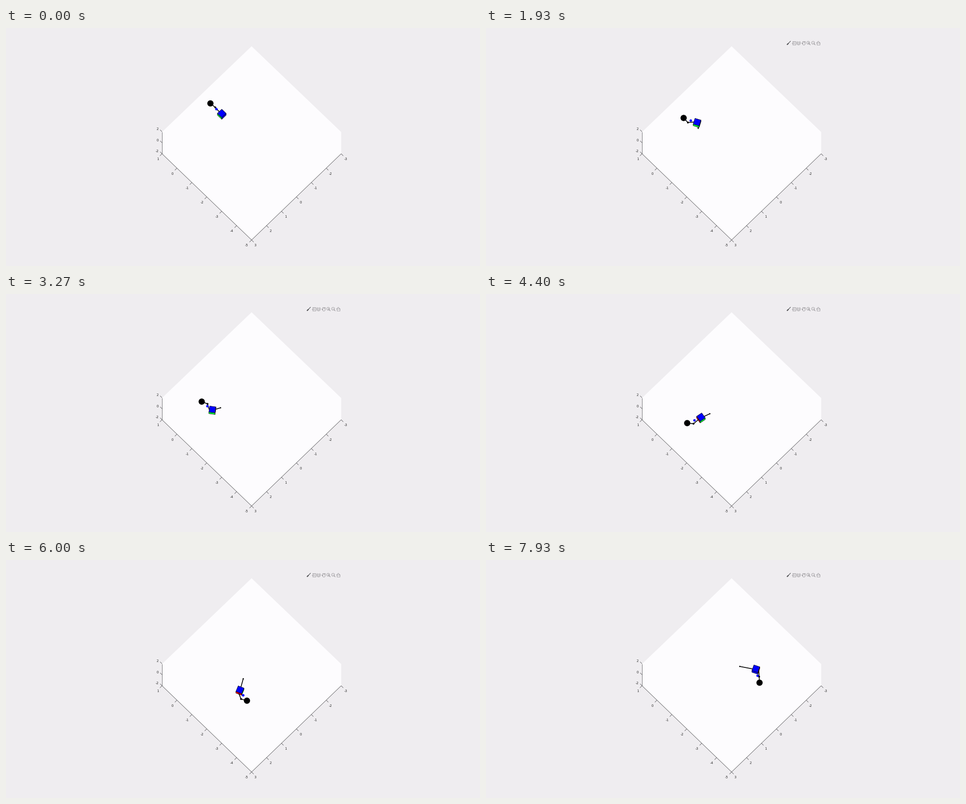
Write a matplotlib script that moves like this. It is 960 px wide and 483 px high and loops after 8000 ms.

```python
import numpy as np
import matplotlib.pyplot as plt
from matplotlib.animation import FuncAnimation
from matplotlib.patches import Arc, Circle, Polygon, Rectangle, RegularPolygon

W, H, DPI = 960, 483, 100
LOOP, INTERVAL = 8000, 40
STEP = 200 / 3           # ms between two poses
PX = 72 / DPI            # points per pixel
INK, GREY = "#47474a", "#7c7a7e"

EDGE, DROP = 12.6, 3.3   # body width and visible side height
LINK = 12.6              # length of each arm link
SWING = 8 / 3            # period of the elbow swing in s

# a few way points, all reached at the same times
TIMES = np.array([0, 1.93, 3.27, 4.4, 6, 7.13, 7.93])
HAND = [(414, 153), (400.3, 182.5), (396.4, 218.5), (407.5, 262),
        (488, 285.5), (534.8, 272.8), (554, 249)]
BODY = [(437, 175), (427.5, 192.5), (418, 236), (435.3, 251.5),
        (473.8, 265), (527.3, 246.3), (546.5, 222.3)]
TAIL = [(437, 176), (429.8, 203.5), (434.5, 231), (453.3, 243),
        (480.5, 241), (498.5, 230), (514, 216)]
YAW = [225, 197, 188, 145, 112, 40, 19]


def glide(points):
    """Smooth motion through the way points, starting at rest."""
    p = np.array(points, float)
    v = np.gradient(p, TIMES, axis=0)
    v[0] = 0

    def at(t):
        i = np.clip(np.searchsorted(TIMES, t, "right") - 1, 0, len(TIMES) - 2)
        h = TIMES[i + 1] - TIMES[i]
        u = min((t - TIMES[i]) / h, 1)
        ease = u * u * (3 - 2 * u)
        return (p[i] + ease * (p[i + 1] - p[i])
                + h * u * (1 - u) * ((1 - u) * v[i] - u * v[i + 1]))
    return at


hand_at, body_at, tail_at, yaw_at = map(glide, (HAND, BODY, TAIL, YAW))


def polar(r, deg):
    a = np.radians(deg)
    return r * np.array([np.cos(a), 0.967 * np.sin(a)])


fig = plt.figure(figsize=(W / DPI, H / DPI), dpi=DPI, facecolor="#efedf0")
ax = fig.add_axes([0, 0, 1, 1])
ax.set_xlim(0, W)
ax.set_ylim(H, 0)
ax.axis("off")


def line(xs, ys, color=INK, width=0.7, z=2):
    return ax.plot(xs, ys, color=color, lw=width * PX, zorder=z,
                   solid_capstyle="butt")[0]


def label(x, y, value, align="center"):
    ax.text(x, y, str(value), fontsize=6.9 * PX, color="#2a2a2a", ha=align,
            va="center_baseline", family="DejaVu Sans")


def draw_axes():
    mid, half, low, bottom = 497.4, 181.4, 255.2, 430.2
    left, right = mid - half, mid + half
    ax.add_patch(Polygon([(mid, 37), (right, 211), (right, low), (mid, bottom),
                          (left, low), (left, 211)], fc="#fdfcfe", ec="none"))
    line([left, left], [210.5, low])
    line([left, mid, right], [low, bottom, low])
    for k in range(7):
        dx, y = half * k / 6, low + (bottom - low) * k / 6
        for x, side in ((left + dx, -1), (right - dx, 1)):
            line([x, x + 4.3 * side], [y, y + 4.3])
        label(307 + 30 * k, 266 + 29.1 * k, 1 - k)
        label(688 - 30.5 * k, 266 + 29.1 * k, k - 3)
    for k in range(3):
        y = 210.5 + 22.3 * k
        line([left, left - 3.8], [y, y - 3.8])
        label(309.3, y - 5.8, 2 - 2 * k, "right")


def draw_toolbar():
    y, parts = 30.5, []

    def stroke(xs, ys, width=0.6):
        parts.append(line(xs, ys, GREY, width, 5))

    def shape(patch):
        patch.set(fill=False, ec=GREY, lw=0.6 * PX, zorder=5)
        parts.append(ax.add_patch(patch))

    # brush
    parts.append(line([612.5, 617], [31, 26.5], INK, 1, 5))
    parts.append(line([609.5, 612.8], [34, 31], INK, 2, 5))
    # data tip
    shape(Rectangle((620.5, y - 3.5), 6.5, 7))
    for dy in (-1.5, 0, 1.5):
        stroke([622, 625.5], [y + dy] * 2, 0.4)
    stroke([618.8, 620.5], [y, y])
    # rotate
    shape(Arc((633, y), 7.6, 7.6, theta1=-60, theta2=240))
    shape(RegularPolygon((633, y), 6, radius=2.2))
    # hand
    shape(Polygon([(639.3, 30), (641.5, 32), (641.5, 27.5), (646.7, 27.5),
                   (646.7, 32), (645.3, 34.3), (642.3, 34.3)]))
    for x in (643.2, 645):
        stroke([x, x], [26.8, 30.3], 0.5)
    # zoom in, zoom out
    for x in (652.5, 662.5):
        shape(Circle((x, 30), 3))
        stroke([x + 2.2, x + 4.5], [32.2, 34.5], 0.9)
        stroke([x - 1.6, x + 1.6], [30, 30])
    stroke([652.5, 652.5], [28.4, 31.6])
    # home
    stroke([669, 673, 677], [30.8, 26.8, 30.8])
    shape(Rectangle((670.2, 30), 5.6, 4.2))
    return parts


draw_axes()
toolbar = draw_toolbar()


def dot(radius, color="black", z=9):
    return ax.add_patch(Circle((0, 0), radius, fc=color, ec="none", zorder=z))


def quad(color, z):
    return ax.add_patch(Polygon(np.zeros((4, 2)), fc=color, ec="black",
                                lw=0.7 * PX, zorder=z))


tail = line([], [], "black", 1.6, 3)
arm = line([], [], "black", 1.6, 3)
sides = [quad(c, 6) for c in ("#ff0000", "#0000ff", "#0000ff", "#00ff3c")]
top = quad("#0000ff", 7)
ball, joint, tip = dot(6.3), dot(1.9), dot(1.3, z=3)
sensor = dot(2.5, "#0000ff")


def draw_body(center, yaw):
    down = np.array([0, DROP])
    corners = [center - down / 2 + polar(EDGE / np.sqrt(2), yaw - 45 + 90 * k)
               for k in range(4)]
    top.set_xy(corners)
    for k, face in enumerate(sides):
        a, b = corners[k], corners[(k + 1) % 4]
        face.set_xy([a, b, b + down, a + down])
        face.set_visible(np.sin(np.radians(yaw + 90 * k)) > 0)


def draw_arm(body, hand, yaw, t):
    shoulder = body + polar(EDGE / 2, yaw)
    reach = hand - shoulder
    normal = np.array([-reach[1], reach[0]]) / np.hypot(*reach)
    bend = np.radians(52) * np.cos(2 * np.pi * (t - 1.93) / SWING)
    elbow = shoulder + reach / 2 - normal * LINK * np.sin(bend / 2)
    arm.set_data(*zip(shoulder, elbow, hand))
    arm.set_zorder(8 if np.sin(np.radians(yaw)) > 0 else 3)
    ball.center, joint.center = hand, elbow
    sensor.center = body + 0.47 * (hand - body)


def update(n):
    step = round(n * INTERVAL / STEP)
    t = step * STEP / 1000
    body, end, yaw = body_at(t), tail_at(t), yaw_at(t)
    draw_body(body, yaw)
    draw_arm(body, hand_at(t), yaw, t)
    tail.set_data(*zip(body, end))
    tip.center = end
    for part in toolbar:
        part.set_visible(step > 0)
    return []


anim = FuncAnimation(fig, update, frames=LOOP // INTERVAL, interval=INTERVAL,
                     repeat=True, repeat_delay=0, init_func=lambda: update(0))
plt.show()
```
